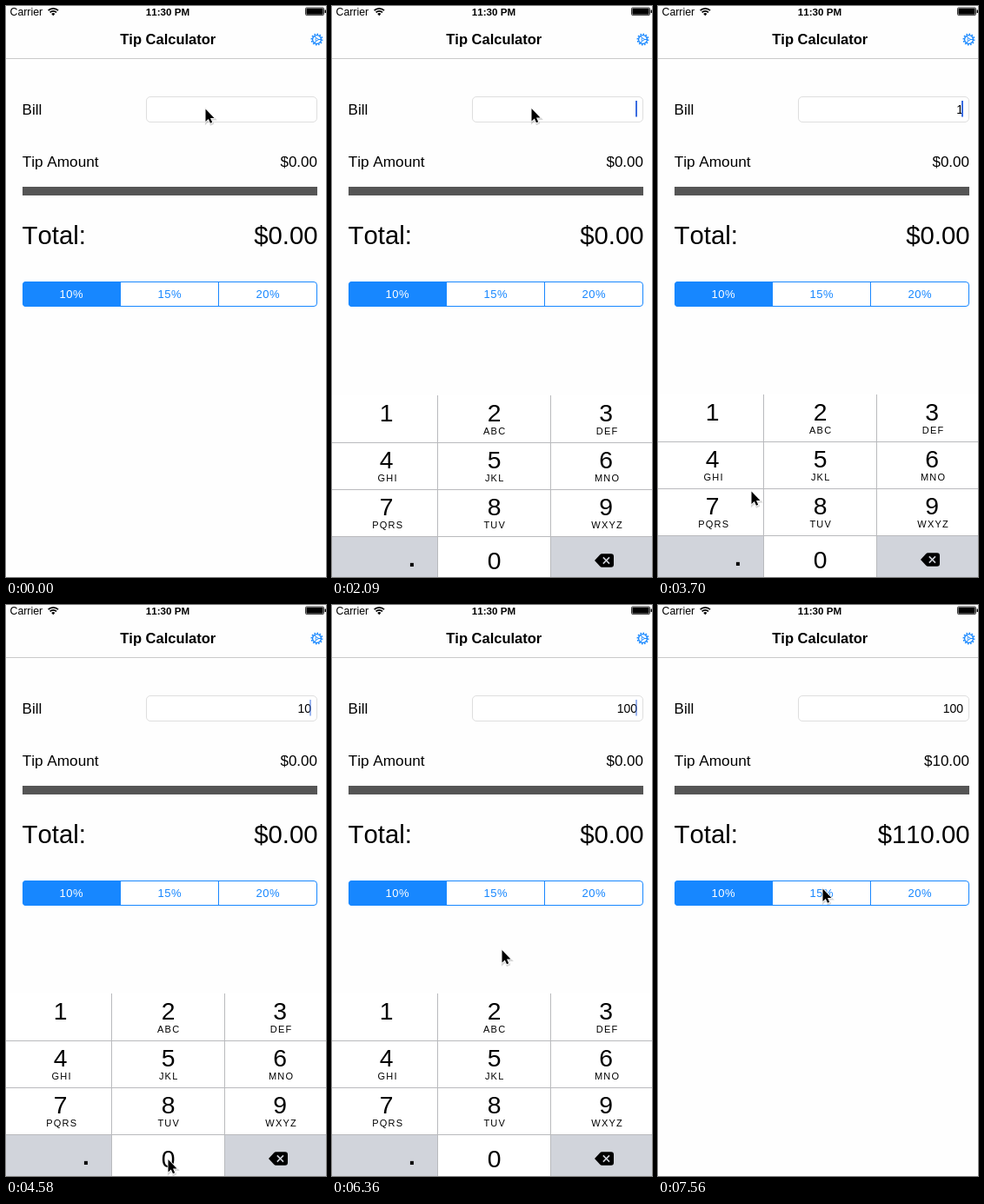
An HTML page that plays this animation: 368x657 px, repeating every 8 s.

```html
<!DOCTYPE html>
<html lang="en">
<head>
<meta charset="utf-8">
<title>Tip Calculator</title>
<style>
  html, body { margin: 0; width: 100%; height: 100%; overflow: hidden; background: #fefefe; }
  svg { display: block; width: 100vw; height: 100vh; }
  text { font-family: "Liberation Sans", Arial, sans-serif; font-kerning: none; white-space: pre; }
  .body { font-size: 17px; }
  .large { font-size: 29.3px; }
  .seg { font-size: 13px; letter-spacing: .5px; fill: #1787ff; text-anchor: middle; }
  .end { text-anchor: end; }
  .digit { font-size: 28.3px; text-anchor: middle; }
  .letters { font-size: 11px; letter-spacing: 1.2px; text-anchor: middle; }
</style>
</head>
<body>
<svg id="stage" viewBox="0 0 368 657" xmlns="http://www.w3.org/2000/svg">
  <rect width="368" height="657" fill="#fefefe"/>

  <!-- status bar -->
  <text x="4.5" y="10.6" font-size="12.3">Carrier</text>
  <g fill="none" stroke="#000" stroke-width="1.7">
    <path d="M48.6 5.2a8 8 0 0 1 11.4 0M50.6 7.4a5.2 5.2 0 0 1 7.4 0"/>
    <path d="M54.3 11.2L52.2 9a3 3 0 0 1 4.2 0z" fill="#000" stroke="none"/>
  </g>
  <text x="186" y="10.6" font-size="11.6" font-weight="bold" text-anchor="middle">11:30 PM</text>
  <rect x="344.5" y="2" width="21" height="8.6" rx="1.2" fill="#fff" stroke="#000" stroke-width=".8"/>
  <rect x="345.4" y="2.8" width="19.2" height="7" rx=".6"/>
  <path d="M366.6 4.6h1.4v3.4h-1.4z"/>

  <!-- navigation bar -->
  <text x="186.3" y="44" font-size="16.5" font-weight="bold" text-anchor="middle">Tip Calculator</text>
  <g transform="translate(357.5 38.5)" fill="none" stroke="#1787ff">
    <circle r="4.9" stroke-width="1.3"/>
    <circle r="6.2" stroke-width="1.5" pathLength="24" stroke-dasharray="1 1"/>
    <circle r="1.4" stroke-width="1"/>
    <path d="M1.5 0H4.5M-.8 1.3L-2.4 4M-.8 -1.3L-2.4 -4"/>
  </g>
  <path d="M0 60.5H368" stroke="#cacaca"/>

  <!-- form -->
  <text class="body" x="18.6" y="125">Bill</text>
  <rect x="161.5" y="104.5" width="196" height="29" rx="4.5" fill="#fff" stroke="#dedede"/>
  <text id="bill" class="end" x="351" y="124" font-size="14"></text>
  <rect id="caret" x="349" y="109" width="2" height="18.5" fill="#3b6ce0"/>
  <text class="body" x="18.7" y="185" style="font-size:17.2px">Tip Amount</text>
  <text id="tip" class="body end" x="358" y="185"></text>
  <rect x="19" y="208" width="339" height="10" fill="#555"/>
  <text class="large" x="18.6" y="273.8">Total:</text>
  <text id="total" class="large end" x="358.6" y="273.8"></text>

  <!-- segmented control -->
  <rect x="19.5" y="317.5" width="338" height="28" rx="3.5" fill="#fff" stroke="#1787ff"/>
  <path d="M132 317H23a4 4 0 0 0-4 4v21a4 4 0 0 0 4 4H132z" fill="#1787ff"/>
  <path d="M244.5 317V346" stroke="#1787ff"/>
  <text class="seg" x="75.2" y="336.3" style="fill:#fff">10%</text>
  <text class="seg" x="188.2" y="336.3">15%</text>
  <text class="seg" x="301.3" y="336.3">20%</text>

  <g id="pad">
    <rect width="368" height="216" fill="#fff"/>
    <path d="M0 162H121V216H0zM252 162H368V216H252z" fill="#d1d4db"/>
    <path d="M0 54.5H368M0 108.5H368M0 162.5H368M121.5 0V216M251.5 0V216" stroke="#b9babd" fill="none"/>
    <text x="92" y="197" font-size="28" font-weight="bold" text-anchor="middle">.</text>
    <g transform="translate(313 190)">
      <path d="M-11 0L-5-6.6Q-4-7.8-2.4-7.8H8Q11-7.8 11-4.8V4.8Q11 7.8 8 7.8H-2.4Q-4 7.8-5 6.6Z"/>
      <path d="M-1.2-3.6L6 3.6M6-3.6L-1.2 3.6" stroke="#d1d4db" stroke-width="1.5"/>
    </g>
  </g>

  <g id="pointer">
    <path d="M0 0V14.5L3.3 11.4 5.5 16.2 7.7 15.2 5.5 10.5H10Z" transform="translate(.6 1.4)" fill="none" stroke="#000" stroke-opacity=".16" stroke-width="2.4"/>
    <path d="M0 0V14.5L3.3 11.4 5.5 16.2 7.7 15.2 5.5 10.5H10Z" stroke="#fff" stroke-width="1.6" stroke-linejoin="round" paint-order="stroke"/>
  </g>
</svg>
<script>
const LOOP = 8000, PAD_TOP = 447, PAD_HEIGHT = 216;
const SPRING = 18.2; // per second
const PAD_OPEN = 1666, PAD_CLOSE = 6416;
const FOCUS = 1700;

// runs of screen updates: first, last, count
const RUNS = [
  [0, 140, 2], [1790, 2820, 8], [2960, 3990, 8], [4140, 4290, 2], [4580, 4730, 2],
  [5180, 5330, 2], [5630, 6070, 4], [6360, 6810, 4], [7110, 7560, 4]
];
// pointer path: time, x, y
const PATH = [
  [0, 229.5, 118.5], [140, 229.5, 118], [2230, 229.5, 118], [3110, 73.5, 468], [3400, 73.5, 470],
  [3700, 107.5, 558.5], [3990, 176, 620], [4140, 186.5, 638], [5480, 186.5, 638],
  [5630, 187.5, 528], [6070, 195.5, 397], [6960, 195.5, 397], [7560, 189.5, 326.5]
];
const BLINKS = [2230, 3100, 4140, 5170, 6360];
const TYPED = [[3500, "1"], [4580, "10"], [5180, "100"]];

const $ = id => document.getElementById(id);
const bill = $("bill"), caret = $("caret"), tip = $("tip"), total = $("total");
const pad = $("pad"), pointer = $("pointer");

function addText(cls, x, y, str) {
  const el = document.createElementNS("http://www.w3.org/2000/svg", "text");
  el.setAttribute("class", cls);
  el.setAttribute("x", x);
  el.setAttribute("y", y);
  el.textContent = str;
  pad.appendChild(el);
}

["", "ABC", "DEF", "GHI", "JKL", "MNO", "PQRS", "TUV", "WXYZ"].forEach((letters, i) => {
  const col = i % 3, y = Math.floor(i / 3) * 54;
  addText("digit", [62.5, 186.7, 315][col], y + 30, i + 1);
  if (letters) addText("letters", [64.2, 187.2, 316.6][col], y + 45.2, letters);
});
addText("digit", 186.7, 199.5, 0);

// latest screen update at or before t
function snap(t) {
  let last = 0;
  for (const [from, to, n] of RUNS)
    for (let i = 0; i < n; i++) {
      const at = Math.floor((from + (to - from) * i / (n - 1)) / 10 + .7) * 10;
      if (at <= t) last = at;
    }
  return last;
}

// share of the way left for a critically damped spring
function remaining(ms) {
  const p = SPRING * Math.max(0, ms) / 1000;
  return (1 + p) * Math.exp(-p);
}

function pointerAt(t) {
  const i = PATH.findIndex(p => p[0] > t);
  if (i < 0) return PATH[PATH.length - 1].slice(1);
  const [t0, x0, y0] = PATH[i - 1], [t1, x1, y1] = PATH[i];
  const k = (t - t0) / (t1 - t0);
  return [x0 + (x1 - x0) * k, y0 + (y1 - y0) * k];
}

function caretAlpha(t) {
  if (t < FOCUS || t >= PAD_CLOSE) return 0;
  const start = BLINKS.filter(b => b <= t).pop();
  const d = start === undefined ? LOOP : t - start;
  if (d < 140) return .5;
  if (d < 430) return 0;
  return d < 455 ? .5 : 1;
}

function draw(time) {
  const t = snap(time);
  const typed = TYPED.filter(k => k[0] <= t).pop();
  const amount = typed ? typed[1] : "";
  const sum = t >= PAD_CLOSE ? Number(amount) : 0;
  bill.textContent = amount;
  tip.textContent = "$" + (sum * .1).toFixed(2);
  total.textContent = "$" + (sum * 1.1).toFixed(2);
  caret.setAttribute("opacity", caretAlpha(t));

  const hidden = t < PAD_CLOSE ? remaining(t - PAD_OPEN) : 1 - remaining(t - PAD_CLOSE);
  pad.setAttribute("transform", `translate(0 ${Math.round(PAD_TOP + PAD_HEIGHT * hidden)})`);
  pointer.setAttribute("transform", `translate(${pointerAt(t)})`);
}

function tick() {
  draw(performance.now() % LOOP);
  requestAnimationFrame(tick);
}
tick();
</script>
</body>
</html>
```
